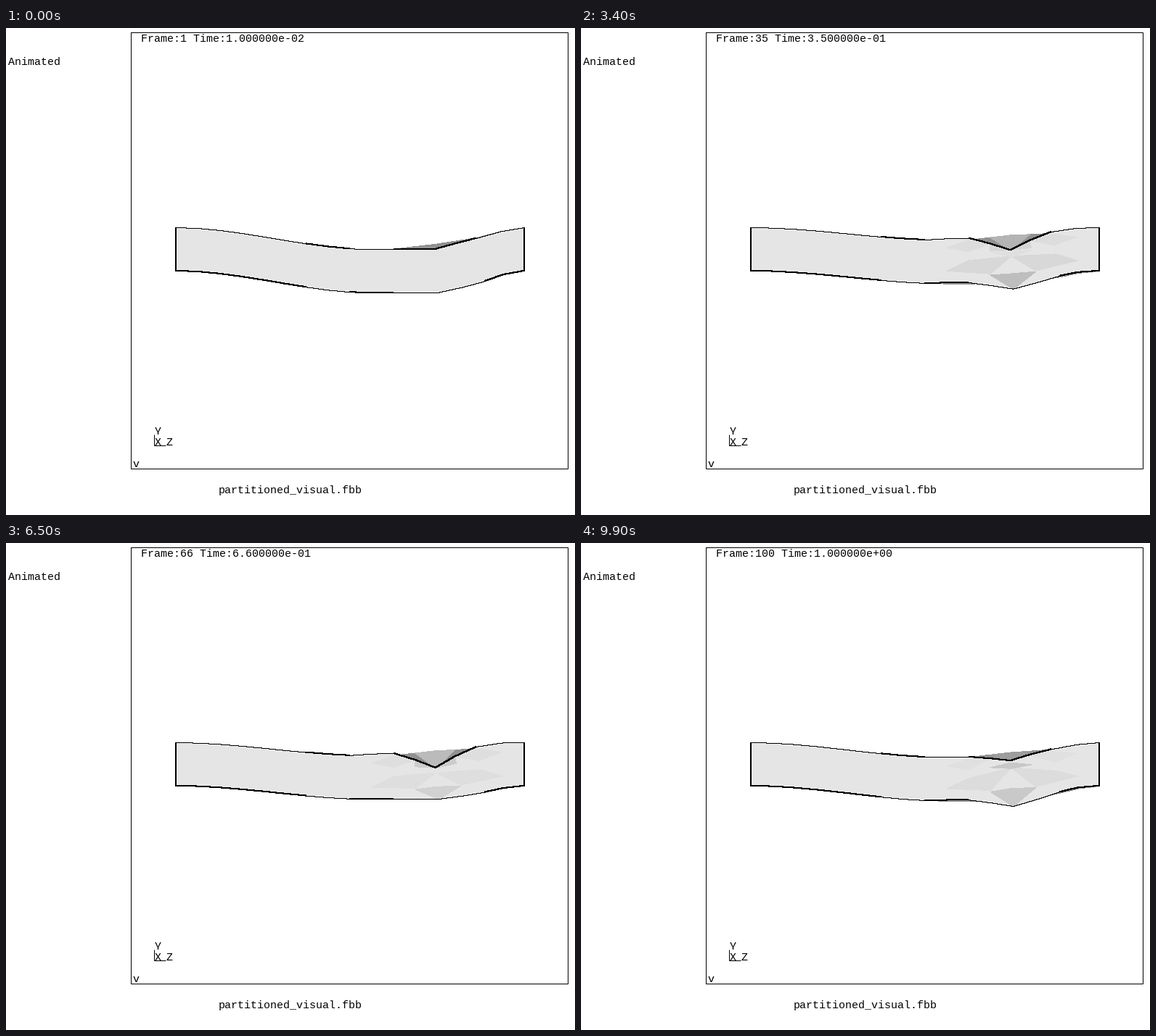
A matplotlib script for the animation above (10 s loop, 784x672 px).

```python
import numpy as np
import matplotlib.pyplot as plt
from matplotlib.animation import FuncAnimation
from matplotlib.patches import Polygon

W, H, DPI, FRAMES = 784, 672, 112, 100
PX = 72 / DPI
BODY, FAR = 229, 145

plt.rcParams.update({
    "toolbar": "None",
    "font.family": "Liberation Mono",
    "text.hinting": "native",
    "text.hinting_factor": 1,
    "path.simplify": False,
})

# Beam: a smooth bend on the left, then coarse columns up to the right end.
LEFT, MID, RIGHT = 234, 474, 714
TOP_Y, BOT_Y = 275.5, 335.4
COL = np.arange(9)
LEAN = 6 * np.exp(-((COL - 5.4) / 1.3) ** 2)
TOP_X, BOT_X = MID + 30 * COL - LEAN, MID + 30 * COL + LEAN
TOP_X[-1] = BOT_X[-1] = RIGHT
SAG = np.array([1, 1.04, 1.04, 1.02, 1.02, .77, .5, .18, 0])
DENT = np.array([0, -.17, -.22, .35, 1, .35, -.19, -.16, 0])
LIFT = 7 * np.exp(-(COL - 4) ** 2 / 1.6)

# time, dent of the top edge, dent of the bottom edge
DENT_KEYS = [(0, 0, 0), (3, 5, 5), (13, 18.6, 3.3), (26, 10.8, 2.8),
             (30, 13, 9), (42, 16.8, 3.2), (50, 16.5, 7), (65, 16.7, 0),
             (72, 9, 11), (81, 1.7, -7.8), (94, 4, 14), (99, 4.6, 7.6)]

# Facets as (column, depth) corners with their response to crush, flex and fold;
# the side ones are mirrored about column 4.
SIDE = [([(1, .73), (2, .5), (4, .15), (3, .72)], (1, 2, 0)),
        ([(1, .2), (2, .05), (3, 0), (2, .3)], (1, 1, 0)),
        ([(3, 0), (4, 0), (3, .17)], (3.8, 0, 0))]
CENTRE = [([(3, .2), (4, .04), (5, .22), (4, .17)], (0, 0, 60)),
          ([(3, .75), (4, .6), (5, .74), (4, 1)], (3, 6, 0))]
MIRROR = [([(8 - k, v) for k, v in pts], gain) for pts, gain in SIDE]
FACETS = SIDE + MIRROR + CENTRE

PIX = np.arange(LEFT, RIGHT + 1)


def within(*spans):
    return np.any([(PIX >= a) & (PIX <= b) for a, b in spans], axis=0)


TOP_BOLD = within((414, MID), (535, 648))
BOT_BOLD = within((LEFT, 414), (MID, 534), (660, RIGHT))


def dents(n):
    keys = np.array(DENT_KEYS)
    i = min(np.searchsorted(keys[:, 0], n, side="right"), len(keys) - 1)
    a, b = keys[i - 1], keys[i]
    u = (n - a[0]) / (b[0] - a[0])
    return (a + (b - a) * u * u * (3 - 2 * u))[1:]


def sag(n):
    return 18.4 + 9.7 * np.exp(-n / 8) + 1.7 * np.cos(2 * np.pi * (n - 100) / 115)


def edge(xs, ys, base):
    s = np.linspace(0, 1, 9)[:-1]
    bend = base + (ys[0] - base) * (2.44 * s**2 - 1.44 * s**3)
    return (np.concatenate([LEFT + (MID - LEFT) * s, xs]),
            np.concatenate([bend, ys]))


def outline(top, bot):
    return np.vstack([np.column_stack(top), np.column_stack(bot)[::-1]])


def gray(v):
    return (v / 255,) * 3


fig = plt.figure(figsize=(W / DPI, H / DPI), dpi=DPI, facecolor="white")
ax = fig.add_axes([0, 0, 1, 1])
ax.set_xlim(0, W)
ax.set_ylim(H, 0)
ax.axis("off")


def patch(z, v=BODY):
    return ax.add_patch(Polygon([(0, 0)] * 3, closed=True, fc=gray(v), ec="none",
                                lw=0, aa=False, zorder=z))


def line(x, y, w=1, **style):
    return ax.plot(x, y, color="black", lw=w * PX, snap=True, zorder=5,
                   solid_capstyle="butt", solid_joinstyle="miter", **style)[0]


def pixel_line(w=1):
    return line(PIX, 0 * PIX, w, drawstyle="steps-mid")


def label(x, y, s):
    return ax.text(x, y, s, fontsize=15 * PX, va="baseline", ha="left", color="black")


line([172, 774, 774, 172, 172], [6, 6, 608, 608, 6])
line([204, 204, 220], [561, 576, 576])
label(3, 51, "Animated")
label(293, 642, "partitioned_visual.fbb")
label(205, 561, "Y")
label(205, 576, "X")
label(220, 576, "Z")
label(175, 606, "v")
title = label(186, 19, "")
for x in (LEFT, RIGHT):
    line([x, x], [275, 336], 2)

far, far_mid, body = patch(1, FAR), patch(1.5), patch(2)
facets = [patch(3) for _ in FACETS]
for f in facets:
    f.set_clip_path(body)
top_lines = pixel_line(), pixel_line(2)
bot_lines = pixel_line(), pixel_line(2)


def draw_edge(lines, curve, bold):
    rows = np.floor(np.interp(PIX, *curve))
    lines[0].set_ydata(rows)
    lines[1].set_ydata(np.where(bold, rows, np.nan))


def draw(n):
    bend = sag(n) * SAG
    p, q = dents(n)
    top_y, bot_y = TOP_Y + bend + p * DENT, BOT_Y + bend + q * DENT
    far_y = TOP_Y + bend - LIFT
    top, bot = edge(TOP_X, top_y, TOP_Y), edge(BOT_X, bot_y, BOT_Y)

    # The far side stays undented and shows wherever the near side recedes.
    far.set_xy(outline(edge(TOP_X, far_y, TOP_Y), edge(BOT_X, BOT_Y + bend, BOT_Y)))
    far_mid.set_xy([*zip(TOP_X[3:6], far_y[3:6]), (TOP_X[4], top_y[4])])
    far_mid.set_facecolor(gray(FAR + 2.5 * p))
    body.set_xy(outline(top, bot))

    crush, flex = max(p - 10, 0), max(abs(q) - 3, 0)
    fold = np.exp(-((p - 8) / 4) ** 2)
    for f, (pts, gain) in zip(facets, FACETS):
        f.set_xy([(TOP_X[k] + (BOT_X[k] - TOP_X[k]) * v,
                   top_y[k] + (bot_y[k] - top_y[k]) * v) for k, v in pts])
        f.set_facecolor(gray(max(BODY - np.dot(gain, (crush, flex, fold)), 170)))

    draw_edge(top_lines, top, TOP_BOLD)
    draw_edge(bot_lines, bot, BOT_BOLD)
    title.set_text(f"Frame:{n + 1} Time:{(n + 1) / 100:.6e}")
    return []


anim = FuncAnimation(fig, draw, frames=FRAMES, interval=100, repeat=True,
                     repeat_delay=0, blit=False)
plt.show()
```
